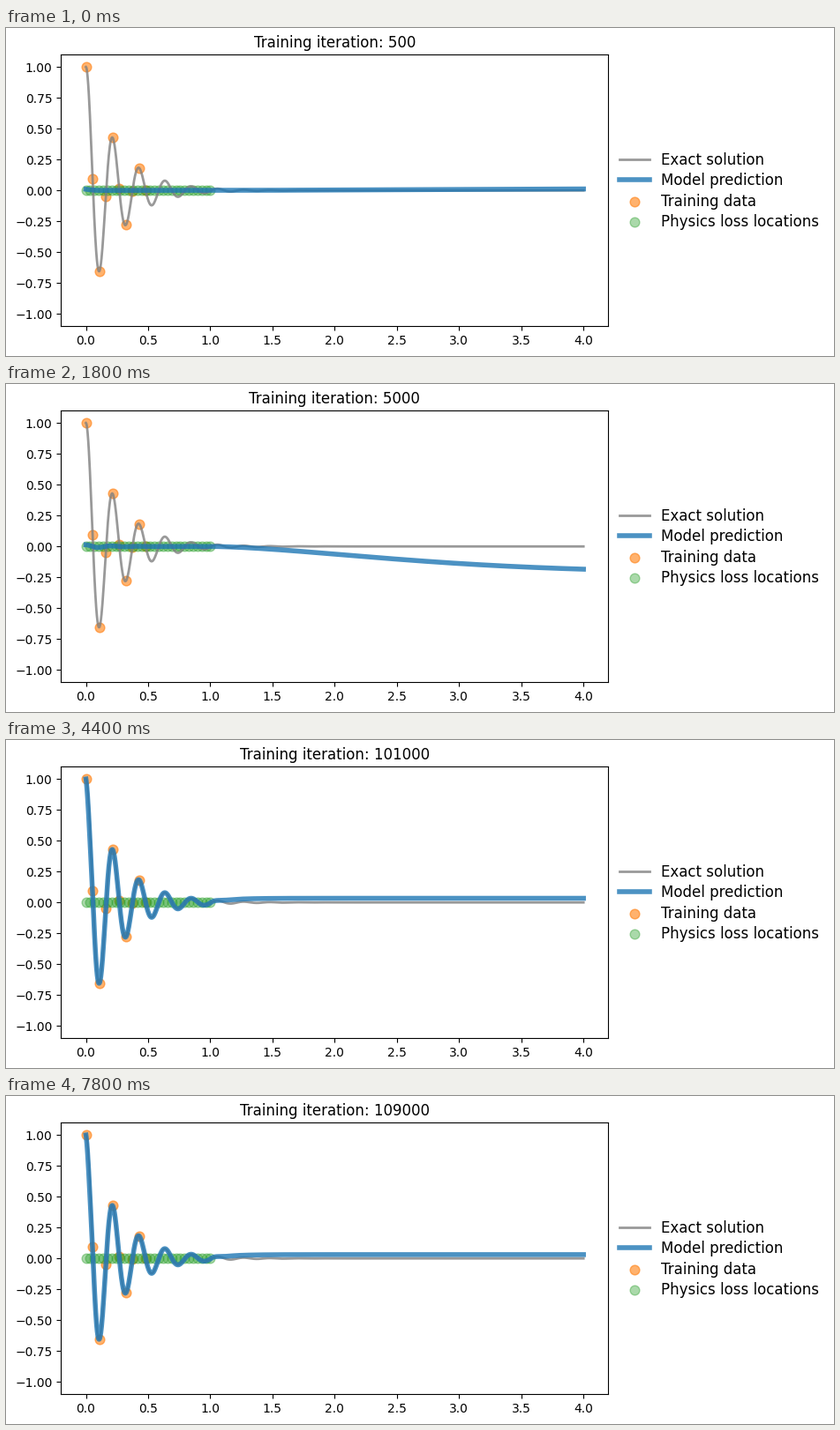
A matplotlib script for the animation above (8000 ms loop, 938x372 px).

```python
import numpy as np
import matplotlib.pyplot as plt
from matplotlib.animation import FuncAnimation

W, H, DPI = 938, 372, 100
LEFT, BOTTOM, AX_W, AX_H = 62.36, 33.77, 620, 308
DAMP, OMEGA0 = 4, 30
OMEGA = np.sqrt(OMEGA0**2 - DAMP**2)

# Snapshots are played in alphabetical order of their five-digit names,
# so 10500 lands between 104500 and 105000.
steps = list(range(500, 11000, 500)) + list(range(100000, 109500, 500))
steps.sort(key=lambda n: f"{n:05d}.png")

# Height of the early prediction at x = 4, by iteration
TAIL_AT = [500, 1000, 1500, 2000, 2500, 3500, 4500, 6000, 6500, 9000, 10500]
TAIL = [.012, -.14, -.232, -.215, -.18, -.132, -.165, -.223, -.216, -.174, -.14]


def exact(x):
    phi = np.arctan(-DAMP / OMEGA)
    return np.exp(-DAMP * x) * np.cos(phi + OMEGA * x) / np.cos(phi)


def early(x, n):
    """Growing ripple near zero plus a drifting tail beyond x = 1."""
    size = np.exp((n - 9000) * 0.00062)
    ripple = (0.183 * np.exp(-6.2 * x) * np.cos(OMEGA * x + 0.1)
              - 0.078 * np.exp(-x / 0.03))
    start = 0.01 * np.exp(-x / 0.05) * max(0, 1 - n / 9000)
    late = np.clip((n - 6500) / 2500, 0, 1)
    power, rate = 1.6 - 0.15 * late, 2 + 0.45 * late
    u = np.clip((x - 1) / 3, 0, 1)
    bend = (1 - np.exp(-rate * u**power)) / (1 - np.exp(-rate))
    return size * ripple + start + np.interp(n, TAIL_AT, TAIL) * bend


def trained(x, n):
    """Follows the solution up to x = 1, then levels off."""
    past = np.maximum(x - 1, 0)
    level = 0.034 - 0.003 * (n - 100000) / 9000
    gap = 0.1 * np.sin(np.pi * np.clip(x / 0.0534, 0, 1))
    return (exact(x) * np.exp(-past / 0.06) - gap
            + level * (1 - np.exp(-past / 0.15)))


def predict(x, n):
    return early(x, n) if n < 50000 else trained(x, n)


plt.rcParams["font.family"] = "DejaVu Sans"
fig = plt.figure(figsize=((W + 0.001) / DPI, (H + 0.001) / DPI), dpi=DPI,
                 facecolor="white")
ax = fig.add_axes([LEFT / W, BOTTOM / H, AX_W / W, AX_H / H])
ax.set(xlim=(-0.2, 4.2), ylim=(-1.1, 1.1),
       xticks=np.arange(0, 4.1, 0.5), yticks=np.arange(-1, 1.1, 0.25))

x = np.linspace(0, 4, 1500)
x_data = x[0:200:20]
x_phys = np.linspace(0, 1, 30)

ax.plot(x, exact(x), color="grey", lw=2, alpha=0.8, label="Exact solution")
model, = ax.plot(x, predict(x, steps[0]), color="tab:blue", lw=4, alpha=0.8,
                 label="Model prediction")
ax.scatter(x_data, exact(x_data), s=60, color="tab:orange", alpha=0.6,
           label="Training data")
ax.scatter(x_phys, 0 * x_phys, s=60, color="tab:green", alpha=0.4,
           label="Physics loss locations")
ax.legend(loc=(1.01, 0.3335), frameon=False, fontsize="large",
          labelspacing=0.32)
title = ax.set_title("")


def update(i):
    n = steps[i]
    model.set_ydata(predict(x, n))
    title.set_text(f"Training iteration: {n}")
    return model, title


anim = FuncAnimation(fig, update, frames=len(steps), interval=200,
                     repeat=True, repeat_delay=0, blit=False)
plt.show()
```
